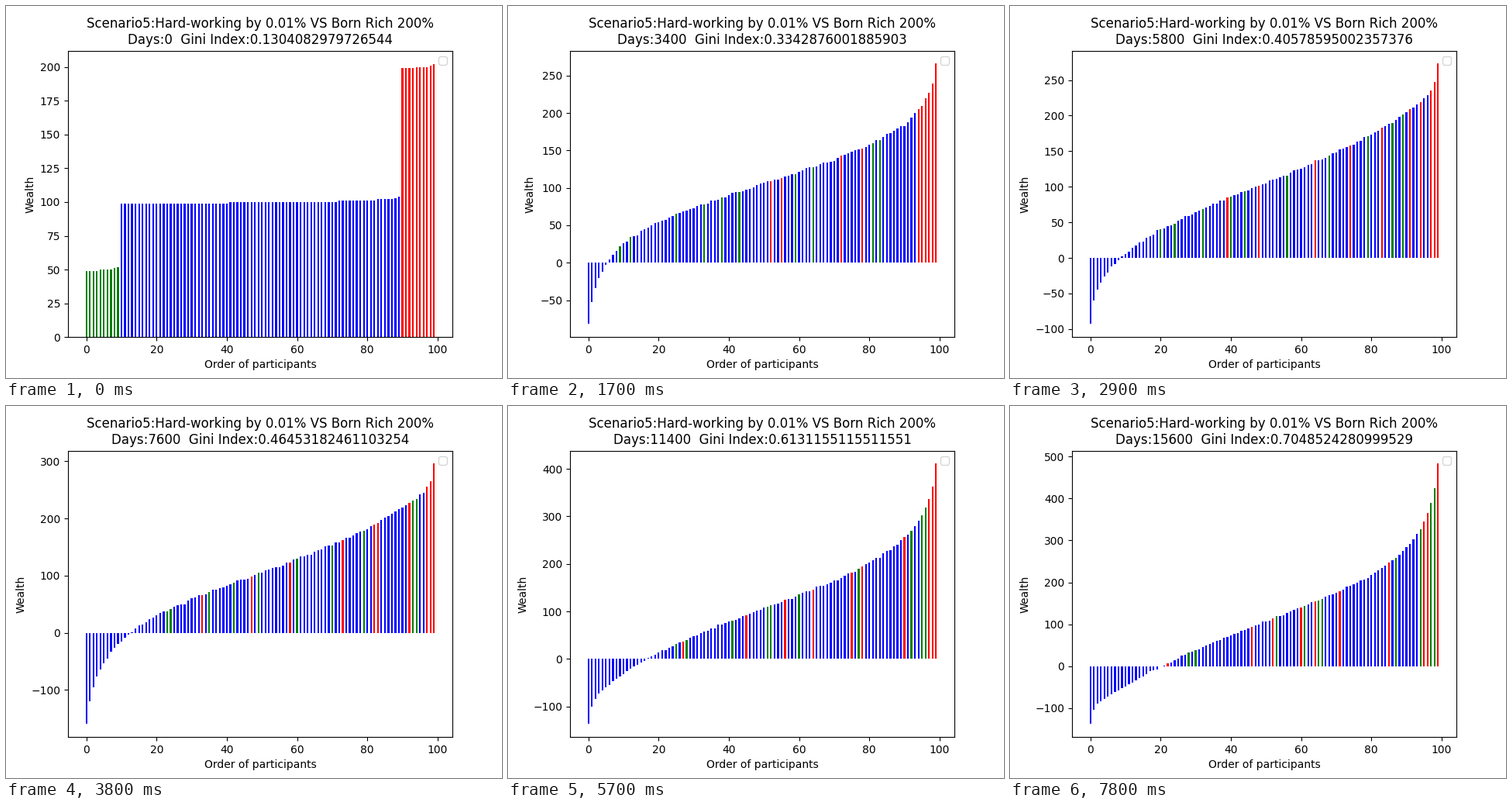
Recreate the animation shown at these times as a matplotlib script. Size 640 px wide and 480 px high, loop 7.9 s.

```python
import numpy as np
import matplotlib.pyplot as plt
from matplotlib.animation import FuncAnimation

PEOPLE, FRAMES, DAYS_PER_FRAME = 100, 79, 200
MIXED = 17        # frame by which the three starting classes have blended
MEAN = 105        # average wealth, conserved by the trades
STEP = 14.9       # spread gained per square root of a frame
EDGE = 1.8        # gain per frame of the hard-working poor

# key points over time: Gini index, poorest and richest wealth
KEY_FRAMES = [0, MIXED, 29, 38, 49, 65, 78]
GINI = [0.1304082979726544, 0.3342876001885903, 0.40578595002357376,
        0.46453182461103254, 0.5585271098538426, 0.6677039132484677,
        0.7048524280999529]
POOREST = [49, -81, -91, -161, -130, -143, -138]
RICHEST = [202, 265, 271, 293, 374, 445, 482]

GROUPS = [("green", 10, 50, -1.5, 1.5),   # color, size, start, luck range
          ("blue", 80, 100, -2.0, 1.5),
          ("red", 10, 200, -1.5, 1.5)]


def quantiles(n):
    return (np.arange(n) + 0.5) / n


def join(rule):
    return np.concatenate([rule(*group) for group in GROUPS])


colors = join(lambda color, n, *_: np.repeat(color, n))
start = join(lambda _c, n, base, *_: base - 1 - np.log(1 - quantiles(n)))
luck = join(lambda _c, n, _b, low, high: np.linspace(low, high, n))
edge = np.where(colors == "green", EDGE, 0)

ranks = np.arange(PEOPLE)
q = quantiles(PEOPLE)
bell = 4.91 * (q ** 0.14 - (1 - q) ** 0.14)   # normal quantiles

rng = np.random.default_rng(5)
ripple = rng.normal(0, 1.2, (FRAMES, PEOPLE))
walk = rng.normal(0, 3, (FRAMES, PEOPLE)).cumsum(axis=0)


def blend(frame):
    return min(1, frame / MIXED) ** 0.7


def mixed_wealth(frame):
    """Bell-shaped sorted wealth, bent to meet the poorest and richest."""
    wealth = MEAN + STEP * np.sqrt(frame) * bell
    low = np.interp(frame, KEY_FRAMES, POOREST) - wealth[0]
    high = np.interp(frame, KEY_FRAMES, RICHEST) - wealth[-1]
    x = ranks / (PEOPLE - 1)
    return wealth + low * (1 - x) ** 20 + high * x ** 20


def sorted_wealth(frame):
    k = blend(frame)
    mixed = mixed_wealth(max(frame, MIXED)) + ripple[frame]
    return np.round(np.sort(start + k * (mixed - start)))


def sorted_colors(frame):
    if frame == 0:
        return colors
    score = start + edge * frame + STEP * np.sqrt(frame) * luck + walk[frame]
    return colors[np.argsort(score)]


def gini(frame):
    time = frame if frame > MIXED else MIXED * blend(frame)
    return float(np.interp(time, KEY_FRAMES, GINI))


fig, ax = plt.subplots(figsize=(6.4, 4.8), dpi=100)


def draw(frame):
    ax.clear()
    ax.bar(ranks, sorted_wealth(frame), width=0.5, color=sorted_colors(frame))
    ax.set_title("Scenario5:Hard-working by 0.01% VS Born Rich 200%\n"
                 f"Days:{frame * DAYS_PER_FRAME}  Gini Index:{gini(frame)}")
    ax.set_xlabel("Order of participants")
    ax.set_ylabel("Wealth")
    ax.legend(handles=[], loc="upper right")


anim = FuncAnimation(fig, draw, frames=FRAMES, init_func=lambda: None,
                     interval=100, repeat=True, repeat_delay=0)
plt.show()
```
